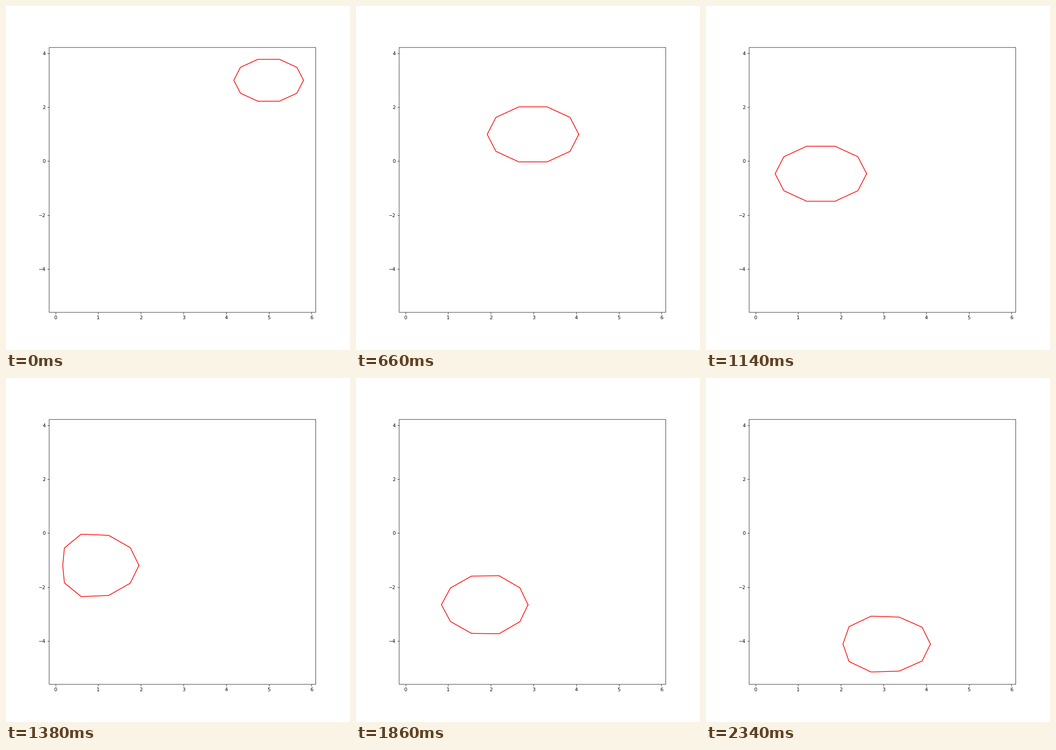
These frames come from a looping animation (748 by 748 pixels, 2.4 s). A matplotlib script:

```python
import numpy as np
import matplotlib.pyplot as plt
from matplotlib.animation import FuncAnimation

FRAMES, INTERVAL = 40, 60
REST_RADIUS = 1.073
theta = np.radians(36 * np.arange(11))


def center(step):
    """Straight drift, turned round smoothly by the soft wall at x = 0."""
    x = 4.995 - .1825 * step + .3305 * np.log1p(np.exp(step - 23.35))
    return x, 3 - .1825 * step


def modes(step):
    """Amplitudes of the ring modes 0 to 4."""
    swell = -.256 * np.exp(-.9 * step)
    press = np.exp(-((step - 23.5) / 1.4) ** 2 / 2)
    dent = press * np.array([-.020, .035, -.168, .060, -.004])

    # ringing that sets in as the ring leaves the wall
    t = step - 28
    free = 1 / (1 + np.exp(-3 * (t + 2)))
    ringing = free * np.array([
        -.013,
        0,
        .071 * np.cos(1.005 * (t - .33)),
        .055 * np.exp(-.025 * t) * np.sin(1.47 * (7.15 - t)),
        .019 * np.cos(1.85 * t + 1.08),
    ])
    amps = dent + ringing
    amps[0] += swell
    return amps


def outline(step):
    cx, cy = center(step)
    radial = np.full_like(theta, REST_RADIUS)
    slide = np.zeros_like(theta)
    for n, a in enumerate(modes(step)):
        radial += a * np.cos(n * theta)
        if n == 1:
            slide += a * np.sin(theta)  # keeps the centre of mass fixed
        elif n > 1:
            slide -= a / n * np.sin(n * theta)  # keeps edge lengths
    x = cx + radial * np.cos(theta) - slide * np.sin(theta)
    y = cy + radial * np.sin(theta) + slide * np.cos(theta)
    return x, y


fig, ax = plt.subplots(figsize=(10, 10), dpi=74.8)
fig.subplots_adjust(left=.125, right=.9, bottom=.11, top=.88)
ax.set_xlim(-.152, 6.095)
ax.set_ylim(-5.604, 4.224)
ax.set_xticks(range(7))
ax.set_yticks(range(-4, 5, 2))

# The frame sits between pixels, so it is drawn without snapping.
ax.set_frame_on(False)
fig.add_artist(plt.Rectangle((.1255, .1095), .775, .77, fill=False,
                             edgecolor="black", lw=.8, snap=False))
ring, = ax.plot([], [], color="red", lw=1.5)


def update(step):
    ring.set_data(*outline(step))
    return ring,


anim = FuncAnimation(fig, update, frames=FRAMES, interval=INTERVAL,
                     init_func=lambda: update(0), repeat=True, repeat_delay=0)
plt.show()
```
